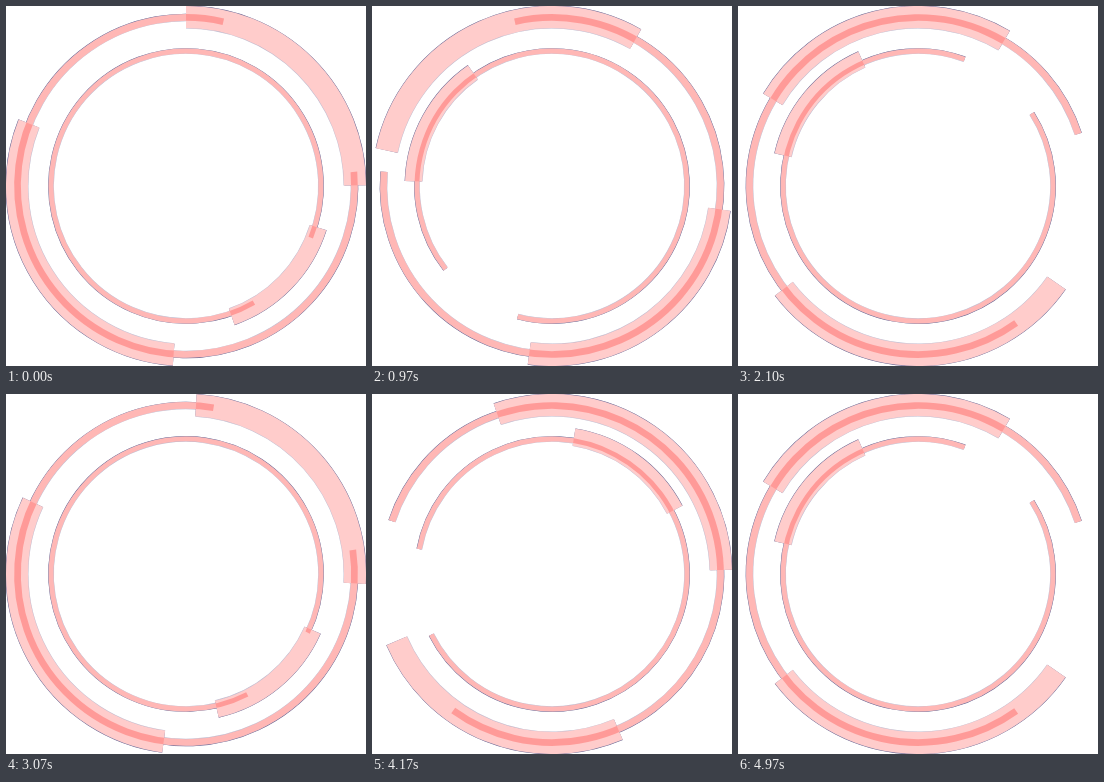
An HTML page that plays this animation: 360 px wide and 360 px high, repeating every 5.07 s.

```html
<!DOCTYPE html>
<html lang="en">
<head>
<meta charset="utf-8">
<title>Rotating rings</title>
<style>
  html, body { margin: 0; width: 100%; height: 100%; overflow: hidden; background: #fff; }
  svg { display: block; width: 100%; height: 100%; }
  path { fill: none; }
</style>
</head>
<body>
<svg id="stage" viewBox="0 0 360 360"></svg>
<script>
const LOOP = 5070;        // ms
const CYCLE = 36;         // poses per turn
const LAST_POSE = 62;
const CENTER = 180;
const INK = 'rgb(254,88,84)';
const BAND = 0.3, LINE = 0.43;
const RIM = 0.9;

// Angles in degrees, clockwise from the right; speed in turns per cycle.
const arcs = [
  { r: 169,   w: 22,  from: -90,  to: -0.2,  alpha: BAND, turns: 1,  ease: 'even' },
  { r: 169,   w: 22,  from: 94.2, to: 201.7, alpha: BAND, turns: 1,  ease: 'even' },
  { r: 138.5, w: 17,  from: 17.5, to: 70.7,  alpha: BAND, turns: 2,  ease: 'late' },
  { r: 168.5, w: 6.7, from: -4.8, to: 282.8, alpha: LINE, turns: -1, ease: 'even' },
  { r: 135,   w: 4.8, from: 59.8, to: 382.5, alpha: LINE, turns: 1,  ease: 'late' }
];

function bezier(x1, x2) {
  return x => {
    let lo = 0, hi = 1;
    for (let i = 0; i < 30; i++) {
      const s = (lo + hi) / 2, m = 1 - s;
      if (3 * m * m * s * x1 + 3 * m * s * s * x2 + s * s * s < x) lo = s; else hi = s;
    }
    return lo * lo * (3 - 2 * lo);
  };
}

const eases = { even: bezier(1 / 3, 2 / 3), late: bezier(1 / 3, 5 / 6) };

function point(r, deg) {
  const a = deg * Math.PI / 180;
  return (CENTER + r * Math.cos(a)).toFixed(3) + ' ' + (CENTER + r * Math.sin(a)).toFixed(3);
}

function arcPath({ r, from, to }) {
  const large = to - from > 180 ? 1 : 0;
  return `M${point(r, from)}A${r} ${r} 0 ${large} 1 ${point(r, to)}`;
}

const stage = document.getElementById('stage');

function addLayer(style) {
  return arcs.map(arc => {
    const path = document.createElementNS('http://www.w3.org/2000/svg', 'path');
    const [color, alpha, width, shift = 0] = style(arc);
    path.setAttribute('d', arcPath({ ...arc, r: arc.r + shift }));
    path.setAttribute('stroke', color);
    path.setAttribute('stroke-opacity', alpha);
    path.setAttribute('stroke-width', width);
    stage.append(path);
    return { path, arc };
  });
}

// Dark rim (stronger outside), white base to keep it on the outline, then the tints.
const parts = [
  ...addLayer(a => ['#2a2060', 0.3, a.w + RIM]),
  ...addLayer(a => ['#2a2060', 0.55, a.w, RIM / 2]),
  ...addLayer(a => ['#fff', 1, a.w]),
  ...addLayer(a => [INK, a.alpha, a.w])
];

// Poses advance at 12.5 per second, shown on a 30 per second clock.
function poseAt(ms) {
  const tick = Math.floor((ms + 4) * 0.03);
  return Math.min(LAST_POSE, Math.floor(tick * 5 / 12)) % CYCLE;
}

function draw(ms) {
  const x = poseAt(ms) / (CYCLE - 1);
  const turn = { even: eases.even(x) * 360, late: eases.late(x) * 360 };
  for (const { path, arc } of parts) {
    const deg = turn[arc.ease] * arc.turns;
    path.setAttribute('transform', `rotate(${deg.toFixed(3)} ${CENTER} ${CENTER})`);
  }
}

const start = performance.now();
function run() {
  draw((performance.now() - start) % LOOP);
  requestAnimationFrame(run);
}
run();
</script>
</body>
</html>
```
